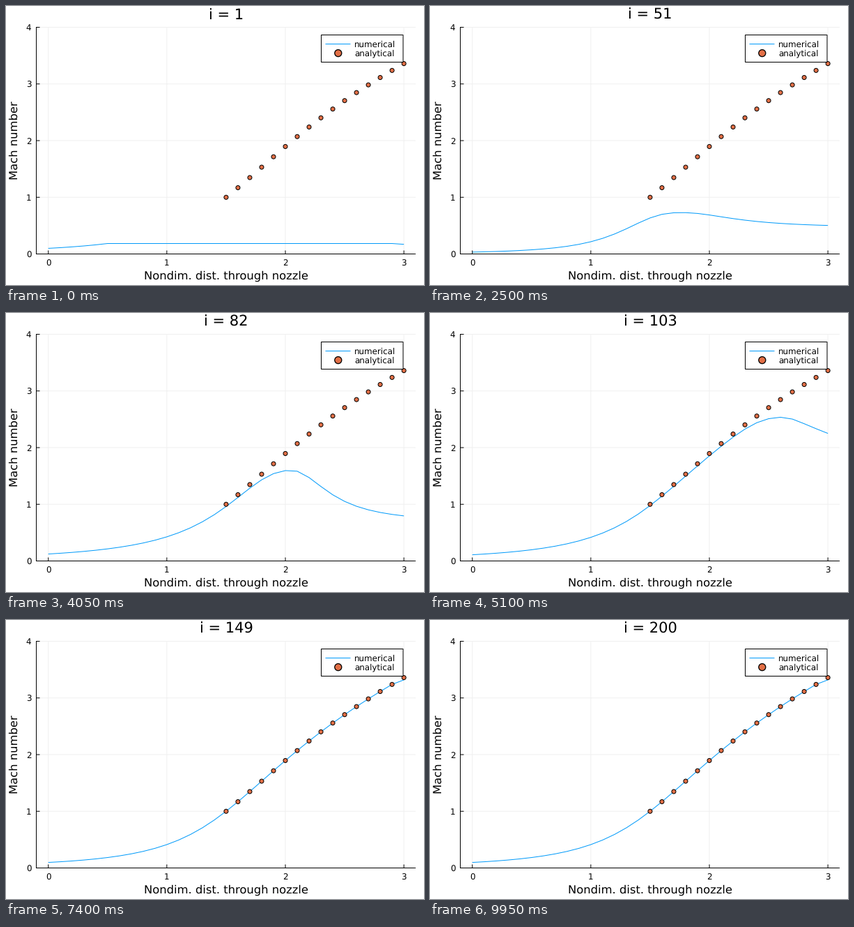
Animation, 600 px wide and 400 px high, one loop 10 s. Source, as a matplotlib script:

```python
import numpy as np
import matplotlib.pyplot as plt
from matplotlib.animation import FuncAnimation
from matplotlib.patches import Circle, Rectangle

W, H, DPI = 600, 400, 100
PT = 72 / DPI                      # points per pixel
FRAMES, INTERVAL = 200, 50
LEFT, RIGHT, TOP, BOTTOM = 43.5, 588, 30.5, 355.5
BLUE, ORANGE, GRID = "#009afa", "#e26f46", "#f0f0f0"

plt.rcParams["font.family"] = "DejaVu Sans"
plt.rcParams["text.hinting"] = "none"

x = np.linspace(0, 3, 31)
area = 1 + 2.2 * (x - 1.5) ** 2


def px(v):
    return 60.7 + 170.15 * v


def py(m):
    return BOTTOM - 81.25 * m


def steady_mach():
    """Isentropic nozzle flow: subsonic up to the throat, supersonic after."""
    supersonic = x > 1.5
    lo = np.where(supersonic, 1.0, 0.01)
    hi = np.where(supersonic, 5.0, 1.0)
    for _ in range(50):
        mid = (lo + hi) / 2
        ratio = ((1 + 0.2 * mid**2) / 1.2) ** 3 / mid
        go_up = (ratio < area) == supersonic
        lo, hi = np.where(go_up, mid, lo), np.where(go_up, hi, mid)
    return (lo + hi) / 2


steady = steady_mach()
start = 0.59 / np.where(x < 0.5, area, 3.2)
start[-1] = 0.17

# Start-up hump: peak place, peak height, outlet level,
# left width, left power, right width
FORMED, SWEPT, SETTLED = 24, 82, 128
HUMP = np.polyfit([FORMED, 51, SWEPT],
                  [[1.69, 0.432, 0.20, 0.576, 2.50, 0.42],
                   [1.77, 0.730, 0.46, 0.555, 2.65, 0.536],
                   [2.05, 1.600, 0.67, 0.662, 2.20, 0.375]], 2)


def smooth(u):
    return u * u * (3 - 2 * u)


def hump(i):
    peak, height, tail, left, power, right = np.array([i * i, i, 1]) @ HUMP
    d = np.abs(x - peak)
    rise = height / (1 + (d / left) ** power)
    fall = tail + (height - tail) / (1 + (d / right) ** 2)
    return np.where(x < peak, rise, fall)


def settled(i):
    """Steady flow with a damped inlet oscillation and an outlet error."""
    n = max(i - SETTLED, 0)
    inlet = -0.06 * np.cos(2 * np.pi * n / 90) * np.exp(-n / 45)
    m = steady * (1 + inlet * np.clip(1 - x / 1.5, 0, 1))
    m[-1] -= 0.04
    return m


def sweep(i):
    """The front runs downstream and leaves the steady flow behind."""
    n = i - SWEPT
    shift = 0.018 * n + 0.0004 * n * n
    behind = np.where(x > 1.5, np.maximum(1.5, x - shift), x)
    moved = steady * np.interp(behind, x, hump(SWEPT) / steady)
    return moved + smooth(n / (SETTLED - SWEPT)) * (settled(i) - moved)


def mach(i):
    if i < FORMED:
        return start + smooth((i - 1) / (FORMED - 1)) * (hump(i) - start)
    if i <= SWEPT:
        return hump(i)
    return sweep(i) if i < SETTLED else settled(i)


fig = plt.figure(figsize=(W / DPI, H / DPI), dpi=DPI, facecolor="white")
ax = fig.add_axes([0, 0, 1, 1])
ax.set_xlim(0, W)
ax.set_ylim(H, 0)
ax.axis("off")


def line(xs, ys, color="black", z=1):
    return ax.plot(xs, ys, color=color, lw=PT, zorder=z, snap=False,
                   solid_capstyle="butt", solid_joinstyle="round")[0]


def dot(cx, cy, radius, edge, z):
    ax.add_patch(Circle((cx, cy), radius, fc=ORANGE, ec="black",
                        lw=edge * PT, zorder=z, snap=False))


def label(tx, ty, s, size, ha="center", **kw):
    return ax.text(tx, ty, s, fontsize=size * PT, ha=ha, va="baseline",
                   zorder=7, **kw)


for v in range(4):
    line([px(v)] * 2, [TOP, BOTTOM], GRID, z=0)
    line([px(v)] * 2, [BOTTOM, BOTTOM - 5], z=4)
    label(px(v), 372.4, str(v), 11.95)
for m in range(5):
    line([LEFT, RIGHT], [py(m)] * 2, GRID, z=0)
    line([LEFT, LEFT + 5], [py(m)] * 2, z=4)
    label(36.3, py(m) + 4.9, str(m), 11.95, ha="right")
line([LEFT - 0.5, RIGHT], [BOTTOM] * 2, z=4)
line([LEFT] * 2, [TOP - 0.5, BOTTOM], z=4)

title = label(316, 19, "", 21)
label(315.6, 392, "Nondim. dist. through nozzle", 16.35)
label(16.8, 192.3, "Mach number", 16.35, rotation=90,
      rotation_mode="anchor")

curve = line(px(x), py(start), BLUE, z=2)
for v, m in zip(x[15:], steady[15:]):
    dot(px(v), py(m), 3, 1, 3)

# Legend
ax.add_patch(Rectangle((452.5, 41.5), 117.5, 39, fc="white", ec="black",
                       lw=PT, zorder=5, snap=False))
line([458.5, 494.5], [54.5] * 2, BLUE, z=6)
dot(476.8, 67.6, 5, 1.3, 6)
label(500, 59, "numerical", 11.95, ha="left")
label(500, 72, "analytical", 11.95, ha="left")


def update(k):
    i = k + 1
    curve.set_ydata(py(mach(i)))
    title.set_text(f"i = {i}")
    return curve, title


anim = FuncAnimation(fig, update, frames=FRAMES, interval=INTERVAL,
                     init_func=lambda: update(0), repeat=True, repeat_delay=0)
plt.show()
```
